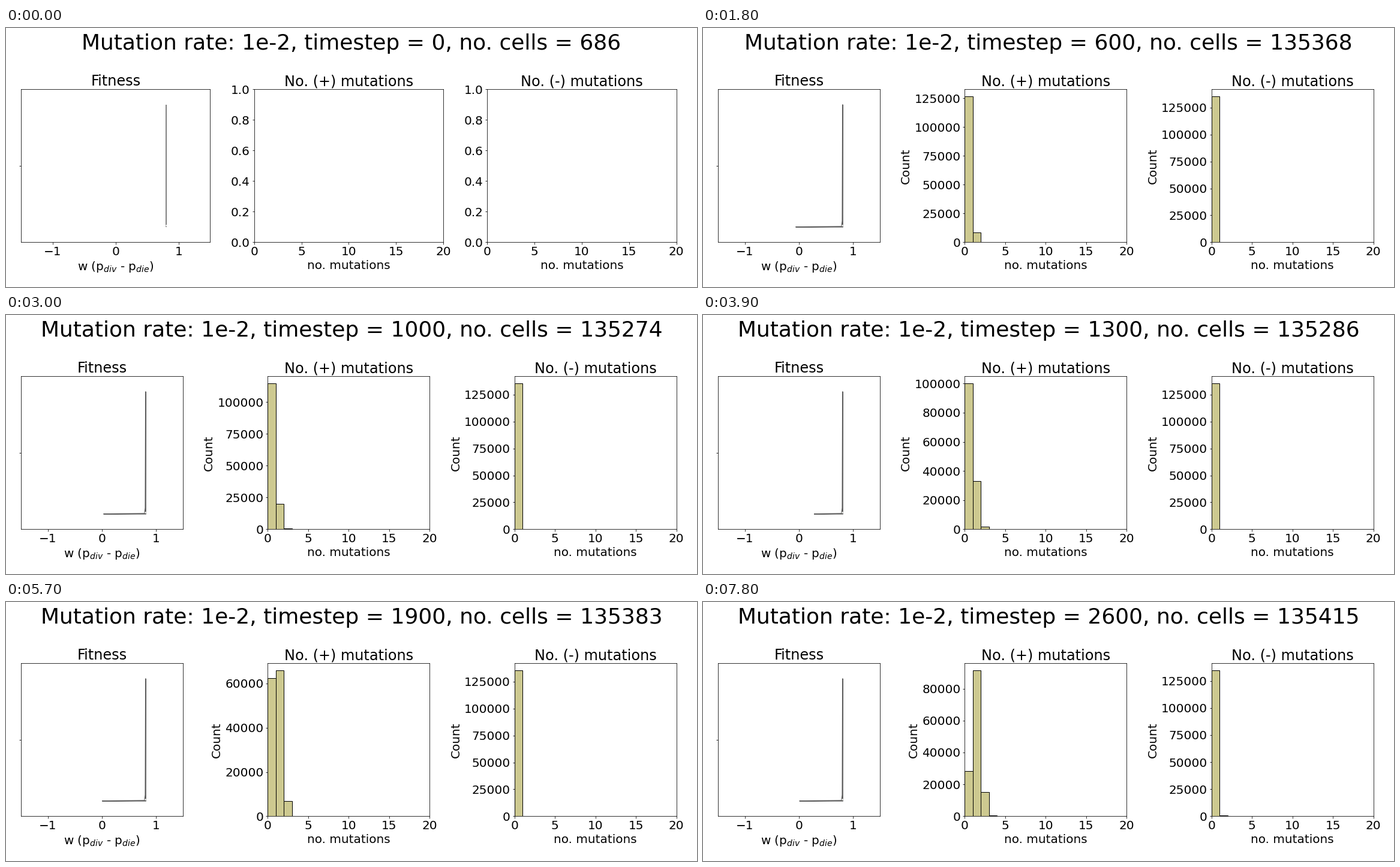
A matplotlib script for the animation above (8000 ms loop, 1152x432 px).

```python
import matplotlib.pyplot as plt
import numpy as np
from matplotlib.animation import FuncAnimation

TICKS_PER_STEP = 3
KHAKI = (0.741, 0.718, 0.420, 0.75)
GRAY = "0.348"

plt.rcParams.update({"font.family": "DejaVu Sans", "font.size": 20})


def cell_count(step):
    """Founders fill the space at once, then hover around its capacity."""
    if step == 0:
        return 686
    return int(np.interp(step, [6, 10, 13, 19, 23, 26],
                         [135368, 135274, 135286, 135383, 135419, 135415]))


def good_shares(step):
    """Shares of cells with 0, 1, 2 and 3 helpful mutations."""
    none = 1 / (1 + np.exp(-4.2536 + 0.2796 * step - 0.0025 * step**2))
    two = (1 - none) * max(0, 0.0066 * (step - 4.5))
    three = 0.03 * two
    return np.array([none, 1 - none - two - three, two, three])


def bad_shares(step):
    """Shares with 0 and 1 harmful mutations; the latter surge late."""
    one = 0.0005 + 0.006 * (step / 26) ** 20
    return np.array([1 - one, one])


def least_fit(step):
    """Left end of the fitness tail, which shortens once and regrows."""
    peak = 0.29 * np.exp(-((step - 13) / 2.3) ** 2)
    return 0.01 + peak - 0.21 * np.exp(-step / 5.5)


def violin(step):
    """Outline of the half violin: flat tail, then a steep spike."""
    if step == 0:
        return [(0.8, 0.4), (0.8, -0.4)]
    return [(least_fit(step), 0.4), (0.79, 0.397), (0.803, 0.36),
            (0.806, 0), (0.809, -0.4), (0.812, 0.4)]


fig, (fit_ax, good_ax, bad_ax) = plt.subplots(1, 3, figsize=(16, 6), dpi=72)
fig.patch.set_facecolor("white")
title = fig.suptitle("", fontsize=36)

fit_ax.set(title="Fitness", xlabel=r"w (p$_{div}$ - p$_{die}$)",
           xlim=(-1.5, 1.5), ylim=(0.5, -0.5))
fit_ax.set_yticks([0], [""])
body = plt.Polygon(violin(0), facecolor=KHAKI, edgecolor=GRAY, lw=1.5)
fit_ax.add_patch(body)
fit_ax.plot(0.803, 0.388, "o", color="white", ms=2.5, mew=0)


def hist(ax, name, shares):
    ax.set(title=name, xlabel="no. mutations", xlim=(0, 20))
    size = len(shares(0))
    bars = ax.bar(range(size), np.zeros(size), width=1, align="edge",
                  facecolor=KHAKI, edgecolor="black", lw=1)
    return ax, bars, shares


panels = [hist(good_ax, "No. (+) mutations", good_shares),
          hist(bad_ax, "No. (-) mutations", bad_shares)]


def draw_hist(ax, bars, shares, step):
    counts = shares(step) * cell_count(step) * (step > 0)
    for bar, count in zip(bars, counts):
        bar.set_height(count)
        bar.set_visible(count > 150)
    ax.set_ylim(0, counts.max() * 1.05 if step else 1)
    ax.set_ylabel("Count" if step else "")


shown = None


def update(frame):
    global shown
    step = frame // TICKS_PER_STEP
    if step != shown:
        shown = step
        title.set_text(f"Mutation rate: 1e-2, timestep = {step * 100}, "
                       f"no. cells = {cell_count(step)}")
        body.set_xy(violin(step))
        for panel in panels:
            draw_hist(*panel, step)
        fig.tight_layout()
    return []


anim = FuncAnimation(fig, update, frames=80, interval=100, repeat=True,
                     repeat_delay=0, blit=False)
plt.show()
```
